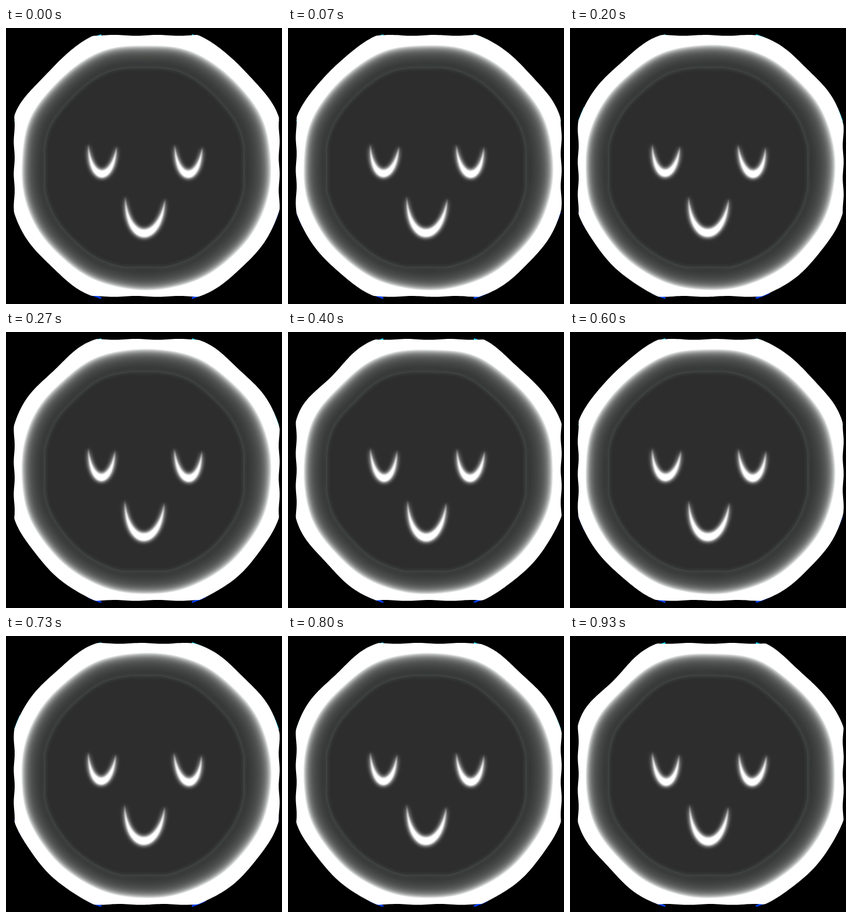
An HTML page with a canvas that plays this animation: 480x480 px, repeating every 990 ms.

```html
<!DOCTYPE html>
<html>
<head>
<meta charset="utf-8">
<style>
  html, body { margin: 0; width: 100%; height: 100%; overflow: hidden; background: #000; }
  canvas { display: block; }
</style>
</head>
<body>
<canvas id="stage" width="480" height="480"></canvas>
<script>
const ctx = document.getElementById('stage').getContext('2d');
const LOOP = 990, STEP = 200 / 3, TAU = Math.PI * 2;
const { sin, cos } = Math;

const clamp = (v, limit) => Math.max(-limit, Math.min(limit, v));
// Swings from -1 to 1 over eight steps, highest at the given step.
const swing = (phase, peak) => cos((phase - peak) / 8 * TAU);

// Hand-drawn unevenness of the circle: flattened corners, stronger at the top.
function wobble(a, phase) {
  const depth = (2.5 - 1.7 * sin(a) - .6 * cos(a)) * (1 + .4 * swing(phase, 6.5));
  return 2 * sin(a) - depth * cos(8 * a) + .8 * sin(13 * a + phase / 8 * TAU);
}

// Closed outline whose sides are cut flat by a box.
function outline(radius, cx, cy, halfW, halfH, wave = 0, turn = 0) {
  const path = new Path2D();
  for (let i = 0; i < 360; i++) {
    const a = i / 360 * TAU, r = radius(a);
    const x = r * cos(a), y = r * sin(a);
    path.lineTo(cx + clamp(x, halfW + wave * sin(y / 9 + turn)),
                cy + clamp(y, halfH + wave * sin(x / 12 + turn)));
  }
  path.closePath();
  return path;
}

// Coloured slivers where the circle meets the box.
function drawFringe() {
  const degree = TAU / 360;
  ctx.lineWidth = 3;
  for (let corner = 0; corner < 4; corner++) {
    ctx.strokeStyle = corner < 2 ? '#0040ff' : '#00d5ff';
    for (const start of [19, 65]) {
      const from = (corner * 90 + start) * degree;
      ctx.beginPath();
      ctx.arc(244.5, 241, 242, from, from + 6 * degree);
      ctx.stroke();
    }
  }
}

function drawDisc(phase) {
  drawFringe();
  ctx.fillStyle = '#fff';
  ctx.fill(outline(a => 242 + wobble(a, phase), 244.7, 239.8, 230.4, 227, .8, phase / 8 * TAU));

  const inner = 176, outer = 217;
  for (let r = outer; r > inner; r--) {
    const t = (r - inner) / (outer - inner);
    const v = Math.round(50 + 55 * t ** 1.3 + 148 * t ** 6);
    ctx.fillStyle = `rgb(${v},${v + 2},${v + 1})`;
    ctx.fill(outline(a => r + 2 * cos(2 * a) * t + .4 * wobble(a, phase), 241 + 3 * t, 241.5, 240, 240));
  }

  const ring = outline(a => 176.5 + .4 * wobble(a, phase), 240.5, 242.5, 173, 173.5);
  ctx.fillStyle = '#2d2d2d';
  ctx.fill(ring);
  ctx.strokeStyle = 'rgba(95,105,102,.3)';
  ctx.lineWidth = 5;
  ctx.filter = 'blur(2.5px)';
  ctx.stroke(ring);
  ctx.filter = 'none';
  ctx.lineWidth = 1;
  ctx.stroke(ring);
}

// Crescent hanging between two tips, the right one a little lower.
function addCrescent(path, left, right, tipY, bottomX, bottomY, thickness) {
  const drop = 4;
  const shift = (bottomX - (left + right) / 2) / .75;
  const controlY = y => (y - (2 * tipY + drop) / 8) / .75;
  const low = controlY(bottomY), high = controlY(bottomY - thickness);
  const inset = thickness * .75;
  path.moveTo(left, tipY);
  path.bezierCurveTo(left + shift, low, right + shift, low, right, tipY + drop);
  path.bezierCurveTo(right - inset + shift, high, left + inset + shift, high, left, tipY);
}

function drawFace(phase) {
  const sway = swing(phase, 6.5), stretch = swing(phase, 1);
  const path = new Path2D();
  addCrescent(path, 143, 191 + 2 * stretch, 202, 166 + sway, 259 + sway, 11);
  addCrescent(path, 293 + sway, 341 + sway, 203, 317 - sway, 260, 11);
  addCrescent(path, 207 + sway, 276 + stretch, 293, 239.5 + sway / 2, 363 + sway / 2, 12);
  ctx.fillStyle = '#fff';
  for (const blur of [5, 3, 1]) {
    ctx.filter = `blur(${blur}px)`;
    ctx.fill(path);
  }
  ctx.filter = 'none';
}

function draw() {
  const time = Math.floor(performance.now() % LOOP / 10) * 10;
  const phase = Math.floor((time + 4) / STEP) % 8;
  ctx.clearRect(0, 0, 480, 480);
  drawDisc(phase);
  drawFace(phase);
  requestAnimationFrame(draw);
}
draw();
</script>
</body>
</html>
```
